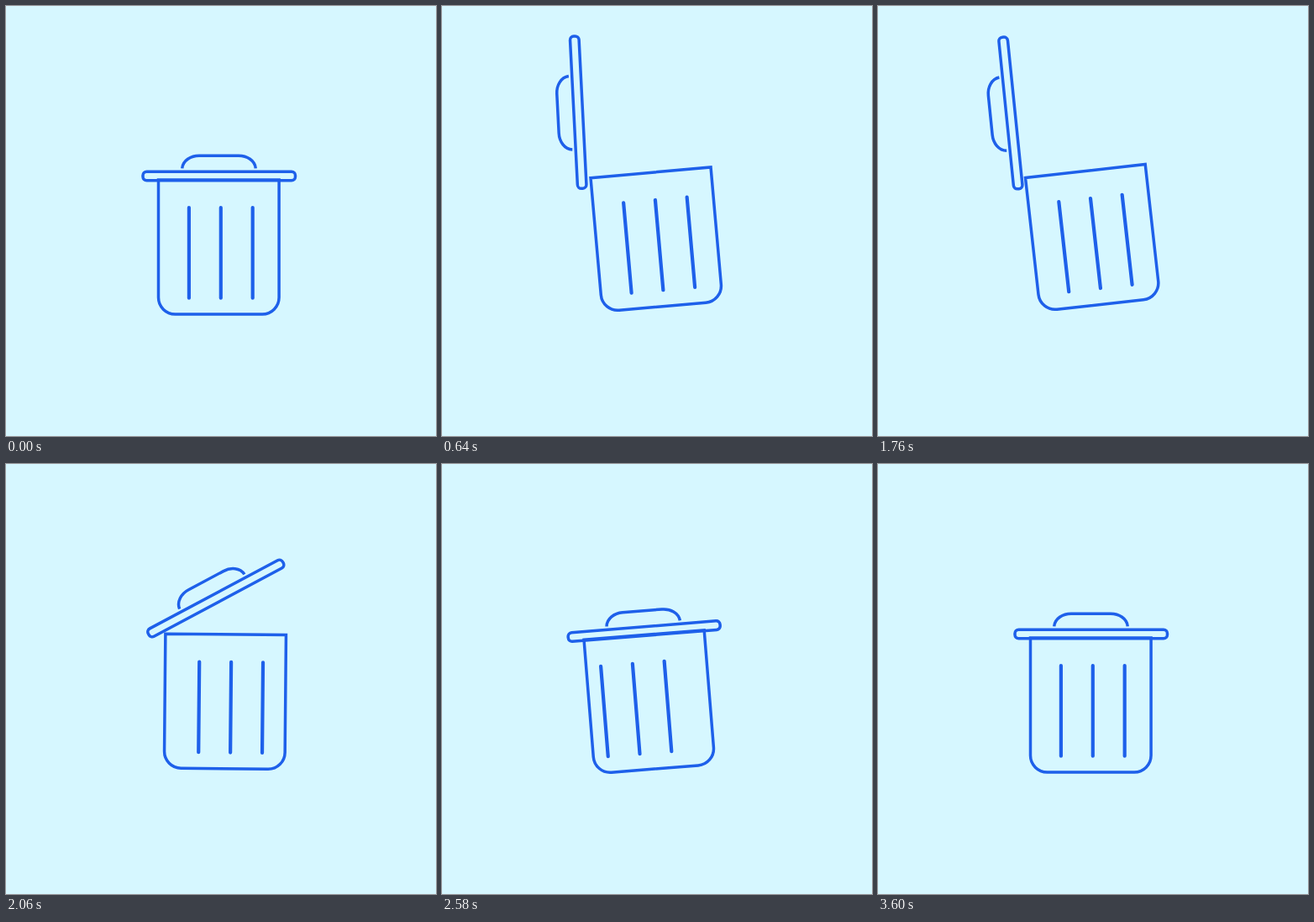
Write an HTML page that moves like this. It is 512 by 512 pixels and loops after 3.82 s.

```html
<!DOCTYPE html>
<html lang="en">
<head>
<meta charset="utf-8">
<title>Bin</title>
<style>
  html, body { margin: 0; width: 100%; height: 100%; overflow: hidden; background: #d6f7ff; }
  svg { display: block; width: 100%; height: 100%; }
  g { fill: none; stroke: #1e60ea; stroke-width: 3.5; }
  line { stroke-width: 4.2; stroke-linecap: round; }
</style>
</head>
<body>
<svg viewBox="0 0 512 512">
  <g id="body">
    <path id="shell"/>
    <line/><line/><line/><line/>
  </g>
  <!-- the lid's own origin is its hinge -->
  <g id="lid">
    <rect x="-.8" y="-9.3" width="181.5" height="10.6" rx="4.5"/>
    <path d="M45.9 -13.2C46.8 -22.5 56.2 -28.3 66.2 -28.3H113.2C123.2 -28.3 132.6 -22.5 133.5 -13.2"/>
  </g>
</svg>
<script>
const LOOP = 3820;
const PITCH = 37.9;
const body = document.getElementById('body');
const lid = document.getElementById('lid');
const shell = document.getElementById('shell');
const slats = document.querySelectorAll('line');

const progress = (t, from, to) => Math.min(1, Math.max(0, (t - from) / (to - from)));
const ramp = (t, from, to) => {
  const u = progress(t, from, to);
  return u * u * (3 - 2 * u);
};
const mix = (a, b, u) => a + (b - a) * u;

function turn(x, y, degrees) {
  const r = degrees * Math.PI / 180;
  return [x * Math.cos(r) - y * Math.sin(r), x * Math.sin(r) + y * Math.cos(r)];
}

// Lean back, slam forward, then rock to a stop: [time, tilt]
const swings = [[200, 0], [950, -8], [1590, -8], [2340, 4.4], [2690, -7.3], [3080, 2.7], [3250, 0]];

function tiltAt(t) {
  return swings.reduce((tilt, [time, value], i) =>
    i ? mix(tilt, value, ramp(t, swings[i - 1][0], time)) : value, 0);
}

function place(el, x, y, angle) {
  el.setAttribute('transform', `translate(${x} ${y}) rotate(${angle})`);
}

function draw(t) {
  const tilt = tiltAt(t);
  const hop = ramp(t, 190, 930) - ramp(t, 1400, 2690);
  const stretch = ramp(t, 2150, 2340) - ramp(t, 2340, 2560);
  const open = ramp(t, 87, 817) - progress(t, 1400, 2132) ** 3;

  // The bin rocks on the bottom corner it leans towards
  const side = 47 * Math.sign(tilt);
  const [rx, ry] = turn(-side, -80, tilt);
  const cx = 253.3 + side + rx + 14.3 * hop + 2.8 * stretch;
  const cy = 367 + ry - 7.8 * hop - 3.6 * stretch;
  place(body, cx, cy, tilt);

  const [hx, hy] = turn(-89.5 - 1.4 * stretch, -80.5, tilt);
  place(lid, mix(cx + hx, 172.8, open), mix(cy + hy, 218, open),
    mix(tilt - 2.2 * stretch, -108, open));

  const width = 143.6 + 12.5 * stretch;
  const left = -width / 2;
  shell.setAttribute('d',
    `M${left} -80H${-left}V60a20 20 0 0 1 -20 20H${left + 20}a20 20 0 0 1 -20 -20Z`);

  // The slats travel one pitch to the right, as if the bin turned
  const shift = PITCH * progress(t, 1910, 3250);
  slats.forEach((slat, k) => {
    const x = -1.5 + PITCH * k + shift + (k > 1 ? 4.5 * stretch : 0);
    const grow = k === 1 ? stretch : 0;
    slat.setAttribute('x1', left + x);
    slat.setAttribute('x2', left + x);
    slat.setAttribute('y1', -47 - 14 * grow);
    slat.setAttribute('y2', 60.7 + 8 * grow);
    slat.setAttribute('visibility', x > 6 && x < width - 16 ? 'visible' : 'hidden');
  });
}

const start = performance.now();
function tick() {
  draw((performance.now() - start) % LOOP);
  requestAnimationFrame(tick);
}
tick();
</script>
</body>
</html>
```
